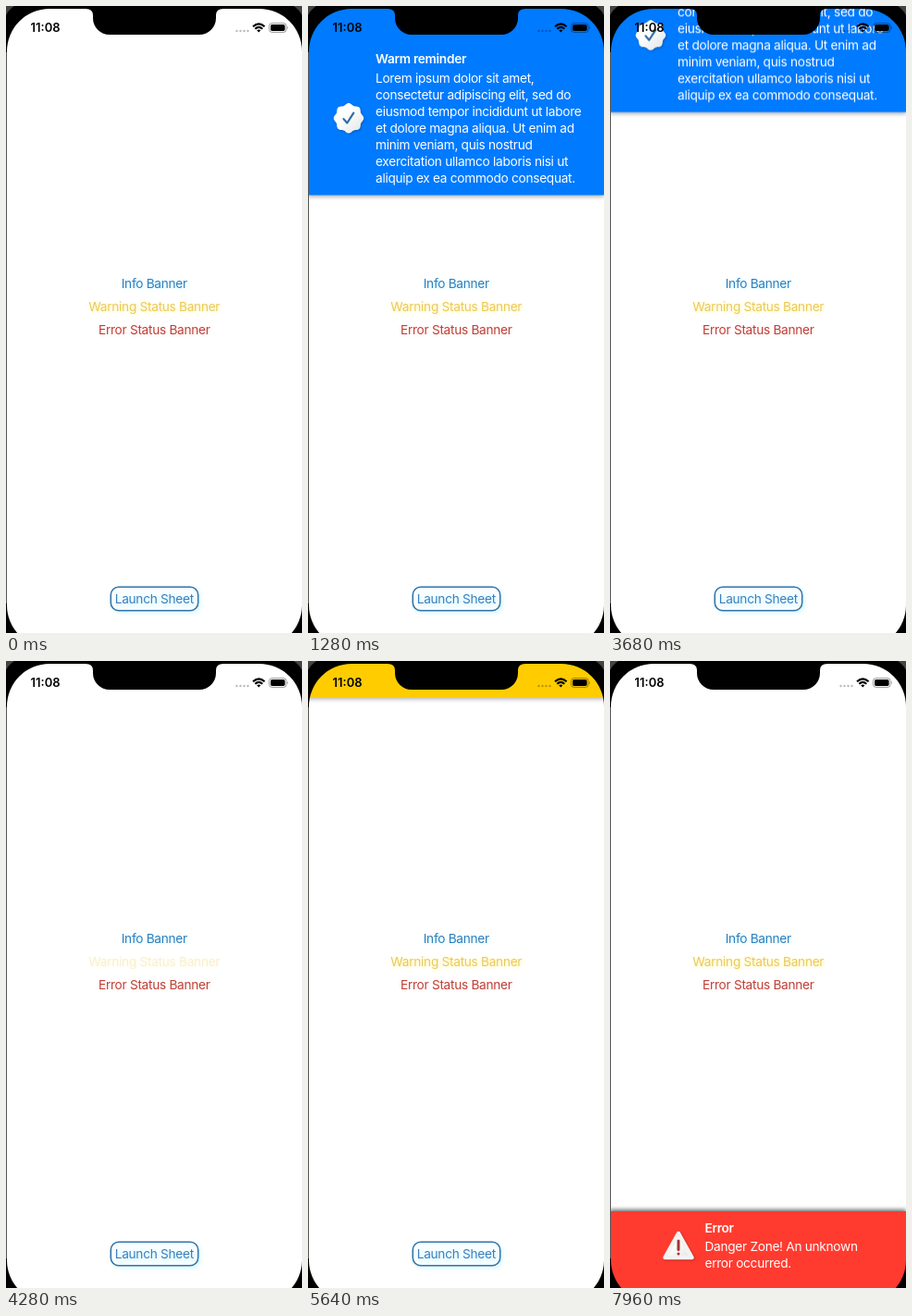
An HTML page for the animation above (8000 ms loop, 320x678 px).

```html
<!DOCTYPE html>
<html lang="en">
<head>
<meta charset="utf-8">
<title>Banners</title>
<style>
  html, body { margin: 0; width: 100%; height: 100%; overflow: hidden; background: #fff; }
  svg { display: block; width: 100vw; height: 100vh; }
  text { font: 400 13.7px Inter, "Liberation Sans", sans-serif; letter-spacing: -.3px; }
  .mid { text-anchor: middle; }
  .bold { font-weight: 600; }
  .white { fill: #fff; }
  #info { fill: #2f7fbd; text-shadow: 1px 1px 4px #c4f3ff; }
  #warn { fill: #ecc85a; text-shadow: 1px 1px 4px #fff59a; }
  #error { fill: #bf4038; text-shadow: 1px 1px 4px #ffe6e2; }
  #sheet text { fill: #3a7fbe; text-shadow: 2px 2px 5px #c4f3ff; }
  #sheet rect { fill: #f8feff; stroke: #3274a8; stroke-width: 1.6; filter: drop-shadow(2px 2px 2px #d8f7ff); }
  .top { filter: drop-shadow(0 2px 2px rgba(0, 0, 0, .3)); }
  .bottom { filter: drop-shadow(0 -2px 2px rgba(0, 0, 0, .55)); }
  .icon { filter: drop-shadow(1px 1px 1px rgba(0, 0, 0, .25)); }
</style>
</head>
<body>
<svg viewBox="0 0 320 678" preserveAspectRatio="none">
  <defs>
    <linearGradient id="pale" x2="1" y2="1">
      <stop offset=".4" stop-color="#fff"/>
      <stop offset="1" stop-color="#dfe3e4"/>
    </linearGradient>
  </defs>
  <rect width="320" height="678" fill="#fff"/>

  <text id="info" class="mid" x="160.3" y="305">Info Banner</text>
  <text id="warn" class="mid" x="160.3" y="330">Warning Status Banner</text>
  <text id="error" class="mid" x="160.3" y="355">Error Status Banner</text>
  <g id="sheet">
    <rect x="113.3" y="628.3" width="94.4" height="25.4" rx="8.5"/>
    <text class="mid" x="160.3" y="646">Launch Sheet</text>
  </g>

  <g id="blue" class="top">
    <rect y="-20" width="320" height="224.500" fill="#007aff"/>
    <g transform="translate(44 121.300)">
      <path id="seal" class="icon" fill="url(#pale)"/>
      <path d="M-5.500 .8L-1.700 5.200L5.300 -5.600" fill="none" stroke="#2a6da8" stroke-width="2.200" stroke-linecap="round" stroke-linejoin="round"/>
    </g>
    <text class="white bold" x="73" y="62">Warm reminder</text>
    <g id="lorem"></g>
  </g>

  <g id="yellow" class="top">
    <rect y="-20" width="320" height="93" fill="#ffcc00"/>
    <text class="mid" x="160.500" y="59">Running out of time!</text>
  </g>

  <g id="red" class="bottom">
    <rect y="595" width="320" height="110" fill="#ff3b30"/>
    <path class="icon" d="M74 619L88.500 645H59.500Z" fill="url(#pale)" stroke="#f4f2f1" stroke-width="4.500" stroke-linejoin="round"/>
    <path d="M74 627V636.500M74 641V641.100" stroke="#a3342c" stroke-width="3" stroke-linecap="round"/>
    <text class="white bold" x="102.500" y="618">Error</text>
    <text class="white" x="102.500" y="638">Danger Zone! An unknown</text>
    <text class="white" x="102.500" y="656">error occurred.</text>
  </g>

  <g id="status">
    <text class="bold" x="26.500" y="28.300" style="font-size:13px;letter-spacing:0">11:08</text>
    <path d="M249.500 27H263" stroke="#000" stroke-opacity=".27" stroke-width="2.400" stroke-linecap="round" stroke-dasharray="0 4"/>
    <g fill="none" stroke="#000" stroke-width="2.100">
      <path d="M267 22.200Q273.300 16.400 279.600 22.200"/>
      <path d="M269.300 24.700Q273.300 21 277.300 24.700"/>
    </g>
    <path d="M271.200 26.300Q273.300 24.600 275.400 26.300L273.300 28.500Z"/>
    <rect x="284.500" y="18.600" width="18.600" height="9.800" rx="3" fill="none" stroke="#000" stroke-opacity=".4"/>
    <rect x="286" y="20.100" width="15.600" height="6.800" rx="1.700"/>
    <path d="M304.200 21.800Q305.800 23.500 304.200 25.200Z" fill-opacity=".45"/>
  </g>

  <path fill-rule="evenodd" d="M0 0H320V700H0ZM47 3H274A46 46 0 0 1 320 49V648A46 46 0 0 1 274 694H47A46 46 0 0 1 1 648V49A46 46 0 0 1 47 3Z"/>
  <path d="M86 2V3Q94 3 94 10V13A18 18 0 0 0 112 31H209A18 18 0 0 0 227 13V10Q227 3 235 3V2Z"/>
  <path d="M0 0H9Q3 4 0 10ZM320 0H311Q317 4 320 10Z" fill="#444"/>
  <path d="M.5 50V646" stroke="#555"/>
</svg>
<script>
  const LOOP = 8000, EASE = "cubic-bezier(.42, 0, .58, 1)";
  const $ = id => document.getElementById(id);

  const lines = ["Lorem ipsum dolor sit amet,", "consectetur adipiscing elit, sed do",
    "eiusmod tempor incididunt ut labore", "et dolore magna aliqua. Ut enim ad",
    "minim veniam, quis nostrud", "exercitation ullamco laboris nisi ut",
    "aliquip ex ea commodo consequat."];
  $("lorem").innerHTML = lines.map((s, i) =>
    `<text class="white" x="73" y="${83 + 18 * i}">${s}</text>`).join("");

  const edge = Array.from({ length: 120 }, (_, i) => {
    const a = i * Math.PI / 60, r = 15.3 + Math.cos(8 * a);
    return (r * Math.cos(a)).toFixed(2) + " " + (r * Math.sin(a)).toFixed(2);
  });
  $("seal").setAttribute("d", "M" + edge.join("L") + "Z");

  // steps: [time in ms, value]
  function run(id, prop, steps) {
    const all = [[0, steps[0][1]], ...steps, [LOOP, steps[steps.length - 1][1]]];
    const frames = all.map(([t, v]) => ({ offset: t / LOOP, [prop]: v, easing: EASE }));
    $(id).animate(frames, { duration: LOOP, iterations: Infinity }).startTime = start;
  }

  const start = document.timeline.currentTime || 0;
  const shift = y => `translateY(${y}px)`;

  run("blue", "transform", [[770, shift(-208)], [1120, shift(0)], [3520, shift(0)], [3870, shift(-208)]]);
  run("yellow", "transform", [[4450, shift(-78)], [4800, shift(0)], [5480, shift(0)], [5830, shift(-78)]]);
  run("red", "transform", [[7520, shift(92)], [7870, shift(0)]]);

  const press = (id, down, up) =>
    run(id, "opacity", [[down, 1], [down + 100, .3], [up, .3], [up + 300, 1]]);
  press("info", 480, 770);
  press("warn", 4160, 4450);
  press("error", 7360, 7520);
</script>
</body>
</html>
```
